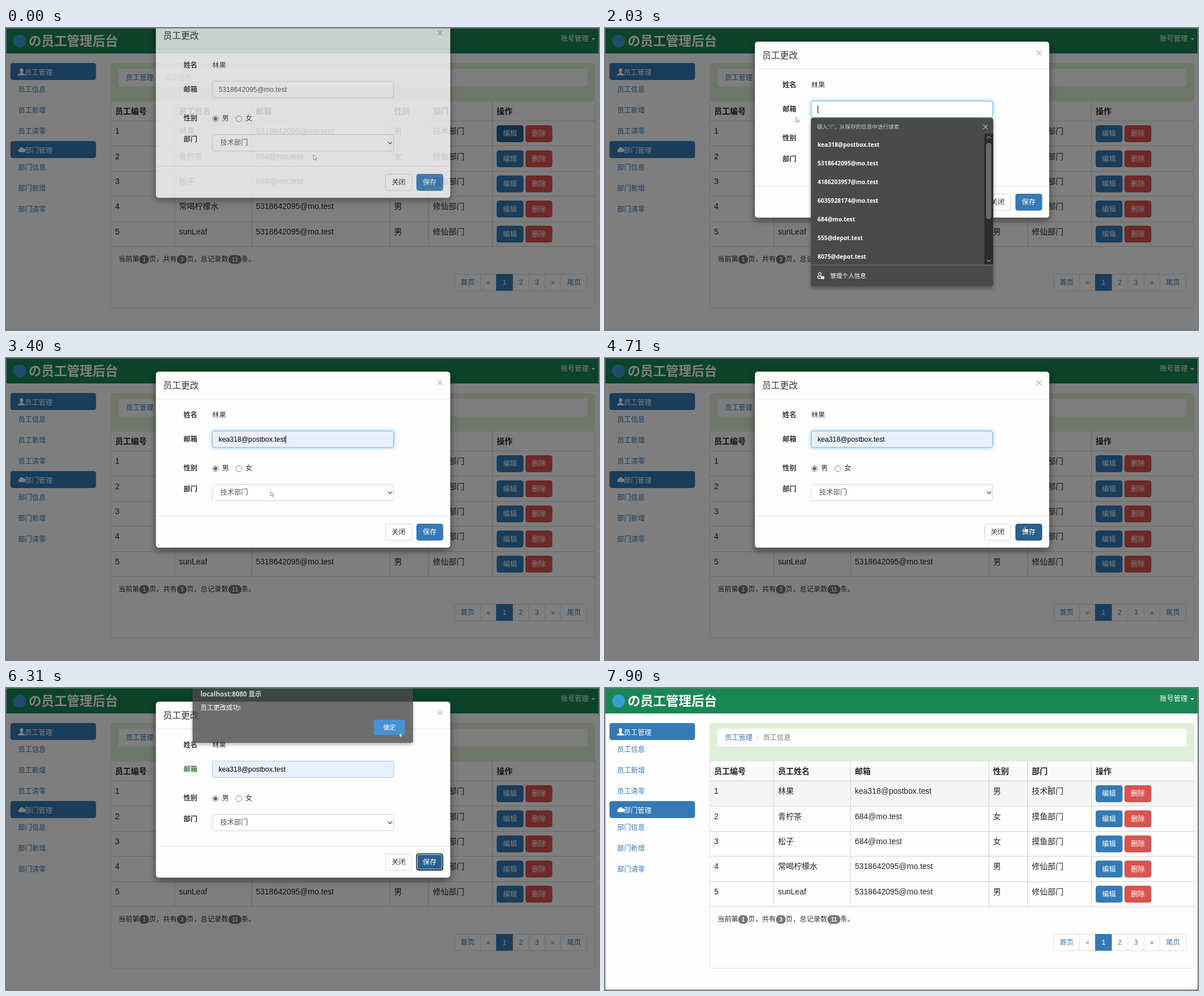
These frames come from a looping animation (1049x534 px, 8 s). An HTML page:

```html
<!DOCTYPE html>
<html lang="zh-CN">
<head>
<meta charset="utf-8">
<title>员工管理后台</title>
<style>
  html, body { margin: 0; width: 100%; height: 100%; overflow: hidden; background: #fff; }
  svg { display: block; width: 100vw; height: 100vh; }
  text { font-family: "Liberation Sans", "Noto Sans CJK SC", "Noto Sans CJK", sans-serif; white-space: pre; }
  .sys { font-family: "Open Sans", "Noto Sans CJK SC", "Noto Sans CJK", sans-serif; }
  .deep { filter: drop-shadow(0 4.4px 6.5px rgba(0,0,0,.5)); }
  .soft { filter: drop-shadow(0 3px 3px rgba(0,0,0,.35)); }
</style>
</head>
<body>
<svg id="stage" viewBox="0 0 1049 534" xmlns="http://www.w3.org/2000/svg"></svg>
<script>
const SMALL = 12.25, BODY = 14;
const BLUE = '#337ab7', BLUE_EDGE = '#2e6da4', BLUE_DARK = '#286090', INK = '#262626';
const OLD_MAIL = '5318642095@mo.test', NEW_MAIL = 'kea318@postbox.test';
const LOOP = 8000;

// cy is the optical middle of the line
const text = (x, cy, str, { size = SMALL, fill = '#333', bold, anchor = 'start', cls = '', id = '' } = {}) =>
  `<text id="${id}" class="${cls}" x="${x}" y="${(cy + size * .365).toFixed(2)}" font-size="${size}" fill="${fill}"
    font-weight="${bold ? 700 : 400}" text-anchor="${anchor}">${str}</text>`;
const rect = (x, y, w, h, fill, { stroke = 'none', r = 0, id = '', cls = '' } = {}) =>
  `<rect id="${id}" class="${cls}" x="${x}" y="${y}" width="${w}" height="${h}" rx="${r}" fill="${fill}" stroke="${stroke}" stroke-width=".9"/>`;
const path = (d, stroke, width = 1, fill = 'none') =>
  `<path d="${d}" fill="${fill}" stroke="${stroke}" stroke-width="${width}"/>`;
const group = (id, body) => `<g id="${id}">${body}</g>`;
const button = (x, y, label, fill, edge, id = '', ink = '#fff') =>
  rect(x + .5, y + .5, 46.4, 28.8, fill, { stroke: edge, r: 3.5, id }) +
  text(x + 23.6, y + 15, label, { fill: ink, anchor: 'middle' });

function sidebar() {
  const section = (y, title, icon, links) =>
    rect(8.4, y + .4, 150.4, 29, BLUE, { stroke: BLUE_EDGE, r: 3.5 }) + icon +
    text(33.3, y + 17, title, { fill: '#fff' }) +
    links.map((s, i) => text(21.4, y + 47 + i * 36.6, s, { fill: BLUE })).join('');
  const user = '<path d="M27.5 71c4.4 0 3.3 6 1.6 7.2v1.3l4 2q.7.6.7 2.3H21q0-1.7.8-2.3l4.1-2v-1.3C24.300 77 23.200 71 27.500 71z" fill="#fff"/>';
  const cloud = '<path d="M24 219.500a2.700 2.700 0 0 1-.4-5.300 4.100 4.100 0 0 1 7.600-1.300 3.300 3.300 0 0 1 0 6.600z" fill="#fff"/>';
  return section(62, '员工管理', user, ['员工信息', '员工新增', '员工清零']) +
         section(200, '部门管理', cloud, ['部门信息', '部门新增', '部门清零']);
}

function table() {
  const cols = [193, 306, 442, 686.5, 755, 868];
  const people = [
    ['林果', OLD_MAIL, '男', '技术部门'],
    ['青柠茶', '684@mo.test', '女', '摸鱼部门'],
    ['松子', '684@mo.test', '女', '摸鱼部门'],
    ['常喝柠檬水', OLD_MAIL, '男', '修仙部门'],
    ['sunLeaf', OLD_MAIL, '男', '修仙部门'],
  ];
  let out = rect(186, 139, 856, 25.5, '#f8f8f8', { id: 'headHover' }) + rect(186, 165, 856, 44, '#f5f5f5', { id: 'rowHover' });
  for (const x of [298.5, 434.5, 679.5, 747.5, 860.5]) out += path(`M${x} 130V387`, '#d0d0d0');
  for (let i = 0; i < 6; i++) out += path(`M186 ${Math.round(164 + i * 44.4) + .5}H1042`, '#d0d0d0');
  ['员工编号', '员工姓名', '邮箱', '性别', '部门', '操作'].forEach((s, i) =>
    out += text(cols[i], 147, s, { size: BODY, fill: INK, bold: true }));
  people.forEach((cells, r) => {
    const y = 182 + r * 44.4;
    [r + 1, ...cells].forEach((s, i) =>
      out += text(cols[i], y, s, { size: BODY, fill: INK, id: r === 0 && i === 2 ? 'cellMail' : '' }));
    out += button(868, y - 10, '编辑', BLUE, BLUE_EDGE, r ? '' : 'edit') + button(919, y - 10, '删除', '#d9534f', '#d43f3a');
  });
  return out;
}

function footer() {
  const badge = (x, w, n) => rect(x, 401.4, w, 15.6, '#777', { r: 7.8 }) +
    text(x + w / 2, 409.2, n, { size: 10.5, fill: '#fff', bold: true, anchor: 'middle' });
  const edges = [793.5, 839.5, 867.5, 896.5, 925, 953.5, 981.5, 1028];
  const pages = ['首页', '«', '1', '2', '3', '»', '尾页'];
  return text(199, 409, '当前第') + badge(235.7, 17.5, 1) + text(253.2, 409, '页，共有') + badge(302.3, 17.5, 3) +
    text(319.8, 409, '页，总记录数') + badge(393.4, 23.2, 11) + text(416.500, 409, '条。') +
    rect(793.5, 435.5, 234.5, 29, '#fff', { stroke: '#d5d5d5', r: 3.5 }) +
    edges.slice(1, -1).map(x => path(`M${x} 436V464`, '#ddd')).join('') +
    rect(867, 435, 29.5, 29.5, BLUE) +
    pages.map((s, i) => text((edges[i] + edges[i + 1]) / 2, 450, s,
      { anchor: 'middle', fill: s === '1' ? '#fff' : s === '«' ? '#777' : BLUE })).join('');
}

const page = () => rect(0, 0, 1049, 534, '#fefefe') + rect(0, 0, 1049, 45, '#198754') +
  '<circle cx="24" cy="23" r="11.5" fill="#35a0d6"/>' +
  text(40, 23, 'の员工管理后台', { size: 22.6, fill: '#fff', bold: true }) +
  text(981.4, 19, '账号管理', { fill: '#fff' }) + path('M1035.500 18h7l-3.500 3.500z', 'none', 0, '#fff') +
  sidebar() +
  rect(185.5, 62.5, 856.5, 433, '#fefefe', { stroke: '#d6e9c6', r: 3.5 }) +
  path('M186 130V66q0-3 3-3H1039q3 0 3 3V130z', 'none', 0, '#dff0d8') +
  rect(199, 72, 829.5, 31.5, '#fefefe', { r: 3.5 }) +
  text(212, 87.5, '员工管理', { fill: BLUE }) + text(268.5, 87.5, '/', { fill: '#bbb' }) +
  text(279.5, 87.5, '员工信息', { fill: '#777' }) + table() + footer();

function modal() {
  const label = (y, s, id) => text(314, y, s, { bold: true, id });
  const radio = (x, on) => `<circle cx="${x}" cy="195.500" r="5.200" fill="#fff" stroke="#767676" stroke-width=".9"/>` +
    (on ? `<circle cx="${x}" cy="195.500" r="3.200" fill="#666"/>` : '');
  return rect(265, 24, 521, 311.5, '#fefefe', { r: 5.2, stroke: 'rgba(0,0,0,.2)', cls: 'deep' }) +
    text(278, 48, '员工更改', { size: 15.75 }) +
    text(767.5, 42.8, '×', { size: 18.4, bold: true, fill: '#c4c4c4', anchor: 'middle' }) +
    path('M265 72.500H786M265 279.500H786', '#e5e5e5') +
    label(101, '姓名') + text(364.7, 101, '林果') + label(144, '邮箱', 'mailLabel') +
    rect(365, 129.2, 320.8, 29, '#fff', { stroke: '#ccc', r: 3.5, id: 'field' }) +
    text(376, 143.7, '', { id: 'mail' }) +
    `<clipPath id="selClip"><rect id="selBox" x="376" y="130" width="121" height="27"/></clipPath>` +
    `<g id="selection" clip-path="url(#selClip)">${rect(376, 136.5, 120.6, 14.5, '#3393fd')}${text(376, 143.7, OLD_MAIL, { fill: '#fff' })}</g>` +
    rect(0, 137, 1, 14, '#000', { id: 'caret' }) +
    label(195, '性别') + radio(370.5, true) + text(382, 195, '男') + radio(412, false) + text(423.6, 195, '女') +
    label(231.500, '部门') + rect(365, 223.5, 320.8, 29, '#fff', { stroke: '#ccc', r: 3.5 }) +
    text(379, 238, '技术部门', { fill: '#555' }) + path('M675.800 236.300l3.700 3.700 3.700-3.700', '#333', 1.2) +
    button(671, 293, '关闭', '#fff', '#ccc', 'close', '#333') + button(726, 293, '保存', BLUE, BLUE_EDGE, 'save') +
    `<rect id="ring" x="727.500" y="294.500" width="43.800" height="25.800" rx="2.500" fill="none" stroke="#fff" stroke-width="1"/>` +
    `<rect id="ringDark" x="726.300" y="293.300" width="46.200" height="28.200" rx="3.500" fill="none" stroke="#101820" stroke-width="1.500"/>`;
}

function menu(items, bottom, long) {
  const foot = bottom - 18.3;
  return rect(364.5, 159, 322, bottom - 159, '#4a4a4a', { r: 4, cls: 'soft', stroke: '#5a5a5a' }) +
    text(375, 174.800, '键入"/"，从保存的信息中进行搜索', { size: 9.6, fill: '#c9c9c9', cls: 'sys' }) +
    path('M669 170.800l8 8m0-8l-8 8', '#eee') +
    (long ? rect(368, 190, 300, 32.5, '#747474', { r: 2, id: 'hover' }) + rect(671, 187, 15.5, 231, '#2b2b2b') +
      rect(674, 203, 9.5, 135, '#696969', { r: 4.700 }) + path('M675.500 195l3.500-3.500 3.500 3.500M675.500 409.500l3.500 3.500 3.500-3.500', '#ddd') : '') +
    items.map((s, i) => text(376, 206 + i * 33.1, s, { size: 10.3, fill: '#fff', bold: true, cls: 'sys' })).join('') +
    path(`M365 ${foot - 19.2}H686`, '#747474') +
    `<g transform="translate(381 ${foot})" fill="none" stroke="#fff" stroke-width="1.100">
      <circle cx="-1" cy="-3.500" r="2.400"/><path d="M0 4.500H-2q-3 0-3-3v-.700H1"/><rect x="1.500" y="1" width="4.800" height="4" fill="#ddd"/></g>` +
    text(398.4, foot, '管理个人信息', { size: 10.600, fill: '#fff', cls: 'sys' });
}

const alertBox = () => `<path class="soft" d="M330-20V98q0 4 4 4H716q4 0 4-4V-20z" fill="#4a4a4a"/>` +
  text(344, 15.5, 'localhost:8080 显示', { size: 11.5, fill: '#fff', bold: true, cls: 'sys' }) +
  text(344, 40, '员工更改成功!', { size: 11.4, fill: '#fff', cls: 'sys' }) +
  rect(650.3, 61, 55.7, 27.3, '#0067c0', { r: 2, id: 'ok' }) +
  text(678.2, 74.800, '确定', { size: 10.8, fill: '#fff', anchor: 'middle', cls: 'sys' });

const cursors = () =>
  group('arrow', path('M0 0V8.200L2 6.500 3.400 9.400 4.800 8.700 3.500 6H6z', '#555', .7, '#fff')) +
  group('beam', path('M-2-5H2M0-5V5M-2 5H2', '#333', .9)) +
  group('hand', path('M0 0q1-1 1.600 0V4l4 .800q.900.500.700 2L5.500 10.500H.700L-2.400 6.500q0-1.300 1.200-1L0 6.300z', '#444', .6, '#fff'));

const stage = document.getElementById('stage');
stage.innerHTML = page() +
  group('dialog', rect(0, 0, 1049, 534, 'rgba(0,0,0,.5)') + group('modal', modal()) +
    group('short', menu([OLD_MAIL], 263.7, false)) +
    group('long', menu([NEW_MAIL, OLD_MAIL, '4186203957@mo.test', '6035928174@mo.test', '684@mo.test', '555@depot.test', '8075@depot.test'], 456.7, true))) +
  group('alert', alertBox()) + cursors() +
  '<rect x=".5" y=".5" width="1048" height="533" fill="none" stroke="#777" stroke-opacity=".8"/>';

// Each step holds until the next; the listed values change, the rest carry over.
const at = (kind, x, y) => ({ cursor: [kind, x, y] });
const steps = [
  [0, { ...at('arrow', 544, 224.500), dialog: true, lift: -35, fade: .77, edit: 'focus', mail: OLD_MAIL, ink: '#555',
        sel: 0, caret: 0, focus: false, filled: false, menu: '', hover: false, save: '', close: false,
        done: false, alert: [0, 0], ok: false, row: '' }],
  [120, { lift: -6, fade: 1 }],
  [260, { ...at('arrow', 530, 190), lift: 0, edit: '' }],
  [400, at('arrow', 510, 165)],
  [540, at('beam', 503, 144)],
  [810, { focus: true, menu: 'short', caret: 496.500 }],
  [945, { ...at('beam', 424, 146), sel: .6, caret: 0 }],
  [1080, { ...at('arrow', 320, 154), sel: 1 }],
  [1760, { mail: '', sel: 0, caret: 376, menu: 'long' }],
  [1900, at('arrow', 338, 158)],
  [2040, at('arrow', 362, 165)],
  [2170, at('arrow', 388, 172)],
  [2310, at('arrow', 410, 177)],
  [2450, at('arrow', 425, 180)],
  [2730, { ...at('arrow', 428, 198), mail: NEW_MAIL, ink: '#000', filled: true, hover: true }],
  [2855, at('arrow', 431, 208)],
  [2980, at('arrow', 432, 213)],
  [3130, { menu: '', caret: 494.500 }],
  [3340, at('arrow', 468, 236)],
  [3550, at('arrow', 500, 258)],
  [4080, { ...at('arrow', 525, 268), caret: 0 }],
  [4206, at('arrow', 575, 283)],
  [4332, at('arrow', 645, 297)],
  [4458, { ...at('hand', 704, 302), close: true }],
  [4584, { ...at('hand', 736, 301), close: false, save: 'hover' }],
  [4710, at('hand', 742.5, 298)],
  [5010, { save: 'focus', focus: false, done: true, alert: [-12, .5] }],
  [5130, { alert: [-3, .85] }],
  [5250, { alert: [0, 1] }],
  [5530, at('arrow', 736, 260)],
  [5660, at('arrow', 724, 190)],
  [5785, at('arrow', 712, 130)],
  [5910, at('arrow', 701, 92)],
  [6040, { ...at('arrow', 696, 79), ok: true }],
  [6310, { alert: [-5, .8] }],
  [6460, { dialog: false, alert: [-13, .3] }],
  [6580, { ...at('arrow', 705, 95), alert: [0, 0] }],
  [6710, at('arrow', 715, 120)],
  [6840, { ...at('arrow', 710, 142), row: 'head' }],
  [6975, at('arrow', 680, 156)],
  [7110, { ...at('arrow', 640, 170), row: 'first' }],
  [7240, at('arrow', 600, 176)],
  [7360, at('arrow', 640, 186)],
  [7495, at('arrow', 750, 195)],
  [7630, { ...at('hand', 888, 192), edit: 'hover' }],
  [7765, { ...at('arrow', 838, 188), edit: '' }],
  [7900, at('beam', 785, 179)],
];

const $ = id => document.getElementById(id);
const show = (id, on) => { $(id).style.display = on ? '' : 'none'; };
const attr = (id, values) => { for (const k in values) $(id).setAttribute(k, values[k]); };

function draw(s) {
  show('dialog', s.dialog);
  attr('modal', { transform: `translate(0 ${s.lift})`, opacity: s.fade });
  attr('edit', { fill: s.edit ? BLUE_DARK : BLUE, stroke: s.edit ? '#204d74' : BLUE_EDGE });
  $('cellMail').textContent = s.dialog ? OLD_MAIL : NEW_MAIL;

  $('mail').textContent = s.mail;
  attr('mail', { fill: s.ink });
  attr('field', { fill: s.filled ? '#e8f0fe' : '#fff', stroke: s.focus ? '#66afe9' : s.done ? '#a3bdd6' : '#ccc' });
  $('field').style.filter = s.focus ? 'drop-shadow(0 0 3.5px rgba(102,175,233,.75))' : '';
  show('selection', s.sel);
  attr('selBox', { x: 376 + 121 * (1 - s.sel) });
  show('caret', s.caret);
  attr('caret', { x: s.caret });
  attr('mailLabel', { fill: s.done ? '#3c763d' : '#333' });

  for (const id of ['short', 'long']) show(id, s.menu === id);
  show('hover', s.hover);
  attr('close', { fill: s.close ? '#e6e6e6' : '#fff' });
  attr('save', { fill: s.save ? BLUE_DARK : BLUE, stroke: s.save ? '#204d74' : BLUE_EDGE });
  show('ring', s.save === 'focus');
  show('ringDark', s.save === 'focus');

  attr('alert', { transform: `translate(0 ${s.alert[0]})`, opacity: s.alert[1] });
  attr('ok', { fill: s.ok ? '#1a76c6' : '#0067c0' });
  show('headHover', s.row);
  show('rowHover', s.row === 'first');

  const [kind, x, y] = s.cursor;
  for (const id of ['arrow', 'beam', 'hand']) show(id, id === kind);
  attr(kind, { transform: `translate(${x} ${y})` });
}

let current = -1;
const start = performance.now();
function tick() {
  const t = (performance.now() - start) % LOOP;
  const index = steps.filter(([time]) => time <= t).length - 1;
  if (index !== current) {
    current = index;
    draw(Object.assign({}, ...steps.slice(0, index + 1).map(step => step[1])));
  }
  requestAnimationFrame(tick);
}
tick();
</script>
</body>
</html>
```
